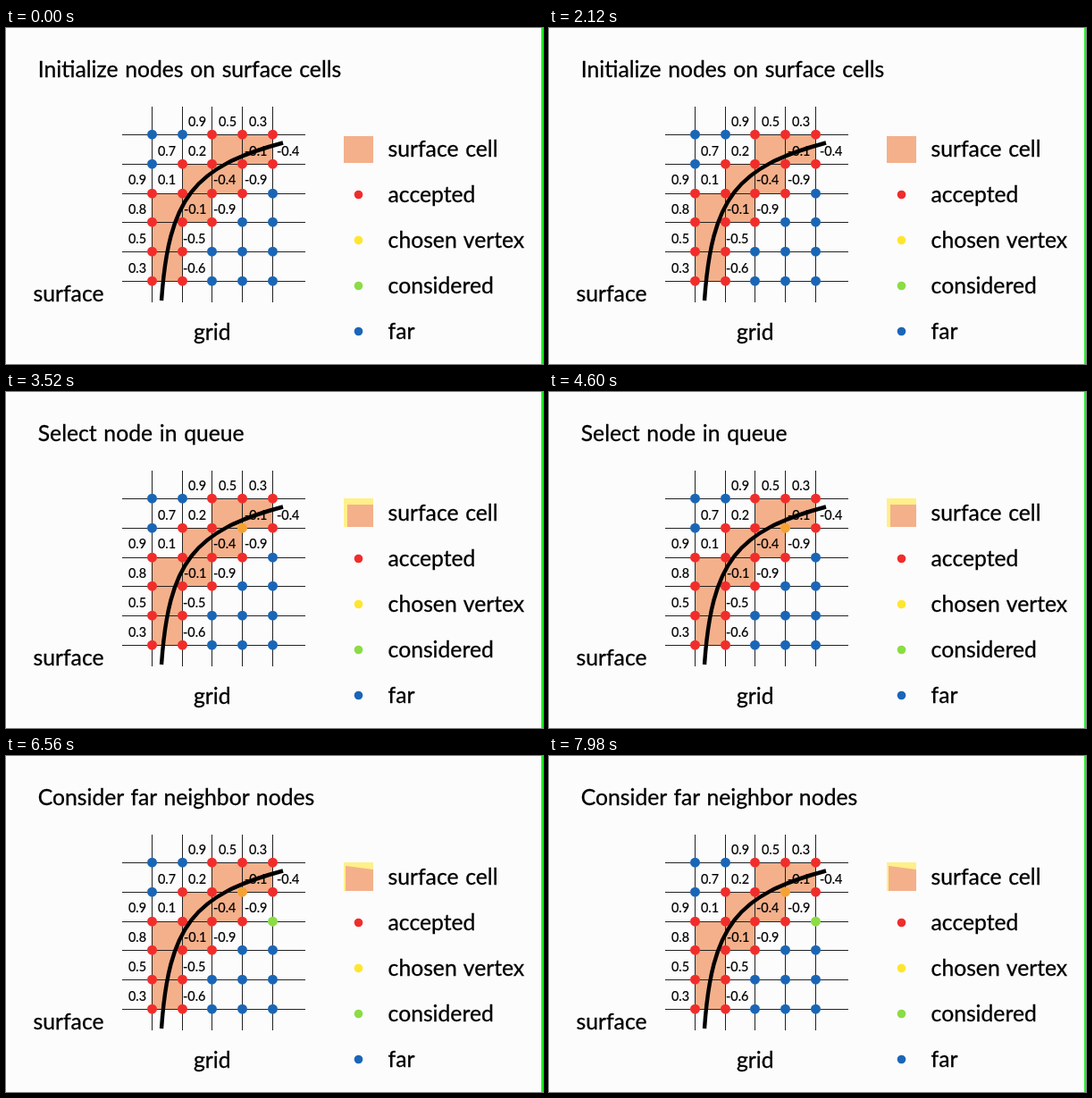
An HTML page that plays this animation: 601 px wide and 376 px high, repeating every 8 s.

```html
<!DOCTYPE html>
<html lang="en">
<head>
<meta charset="utf-8">
<title>Node selection on a grid</title>
<style>
  html, body { margin: 0; width: 100%; height: 100%; overflow: hidden; background: #fcfcfd; }
  svg { display: block; width: 601px; height: 376px; }
  text {
    font-family: Lato, "Open Sans", sans-serif; font-size: 24.7px; word-spacing: 1.4px;
    fill: #000; stroke: #000; stroke-width: 0.3px;
  }
  .value { font-size: 14.4px; stroke-width: 0.2px; }
</style>
</head>
<body>
<svg id="stage" viewBox="0 0 601 376" xmlns="http://www.w3.org/2000/svg"></svg>
<script>
const LOOP = 8000;
const RED = '#f02d2b', BLUE = '#1a66b6', YELLOW = '#ffe62e', GREEN = '#8bdc45';
const CHOSEN = '#f5a233', CELL = '#f4b08a', PALE = '#fff08a';

const columns = [163.5, 197.5, 230.5, 264.5, 298.5];
const rows = [119.5, 152.5, 185.5, 217.5, 250.5, 283.5];

// r = accepted, b = far; one string per grid row
const nodeRows = ['bbrrr', 'brrrr', 'rrrrb', 'rrrbb', 'rrbbb', 'rrbbb'];

// [column, row] of the cells crossed by the surface
const cells = [[2, 0], [3, 0], [1, 1], [2, 1], [0, 2], [1, 2], [0, 3], [0, 4]];

// baseline, then pairs of x and value
const valueRows = [
  [110, 204, '0.9', 238, '0.5', 272, '0.3'],
  [142.5, 170, '0.7', 204, '0.2', 267, '-0.1', 303, '-0.4'],
  [174.5, 137, '0.9', 170, '0.1', 232, '-0.4', 267, '-0.9'],
  [207.5, 137, '0.8', 199, '-0.1', 232, '-0.9'],
  [240.5, 137, '0.5', 198, '-0.5'],
  [274, 137, '0.3', 198, '-0.6']
];

const legend = [['surface cell'], ['accepted', RED], ['chosen vertex', YELLOW],
  ['considered', GREEN], ['far', BLUE]];

const stages = [
  { start: 0, title: 'Initialize nodes on surface cells', chosen: RED, neighbor: BLUE,
    swatch: '378,121 411,121 411,151 378,151', back: 'none' },
  { start: 2340, title: 'Select node in queue', chosen: CHOSEN, neighbor: BLUE,
    swatch: '382,126 411,126 411,151 382,151', back: PALE },
  { start: 5340, title: 'Consider far neighbor nodes', chosen: CHOSEN, neighbor: GREEN,
    swatch: '380,123 411,127 411,151 380,151', back: PALE }
];

const svg = document.getElementById('stage');

function add(tag, attributes, content = '') {
  const element = document.createElementNS('http://www.w3.org/2000/svg', tag);
  for (const [name, value] of Object.entries(attributes)) element.setAttribute(name, value);
  element.textContent = content;
  return svg.appendChild(element);
}
const label = (x, y, content, className = '') => add('text', { x, y, class: className }, content);
const dot = (cx, cy, r, fill) => add('circle', { cx, cy, r, fill });
const line = (x1, y1, x2, y2) =>
  add('line', { x1, y1, x2, y2, stroke: '#222', 'stroke-width': 1 });

for (const [c, r] of cells) {
  add('rect', { x: columns[c], y: rows[r], width: columns[c + 1] - columns[c],
    height: rows[r + 1] - rows[r], fill: CELL });
}
columns.forEach(x => line(x, 88, x, 307));
rows.forEach(y => line(130, y, 335, y));

for (const [y, ...pairs] of valueRows) {
  for (let i = 0; i < pairs.length; i += 2) label(pairs[i], y, pairs[i + 1], 'value');
}

const nodes = nodeRows.map((kinds, r) => [...kinds].map((kind, c) =>
  dot(columns[c], rows[r] - 0.3, 5.5, kind === 'r' ? RED : BLUE)));

add('path', { d: 'M174 305 C182 190 210 155 310 128.5', fill: 'none', stroke: '#000',
  'stroke-width': 4.4 });

const swatchBack = add('rect', { x: 378, y: 119, width: 33, height: 32 });
const swatch = add('polygon', { fill: CELL });
legend.forEach(([name, color], i) => {
  label(427.6, 143.7 + 51 * i, name);
  if (color) dot(394.5, 135.5 + 51 * i, 4.8, color);
});

label(30.6, 305.6, 'surface');
label(210, 349.4, 'grid');
const title = label(35.8, 54.5, '');
add('rect', { x: 599, y: 0, width: 2, height: 376, fill: '#1cf522' });

function render(now) {
  const time = now % LOOP;
  const stage = stages.findLast(s => time >= s.start);
  title.textContent = stage.title;
  nodes[1][3].setAttribute('fill', stage.chosen);
  nodes[2][4].setAttribute('fill', stage.neighbor);
  swatchBack.setAttribute('fill', stage.back);
  swatch.setAttribute('points', stage.swatch);
  requestAnimationFrame(render);
}
render(0);
</script>
</body>
</html>
```
